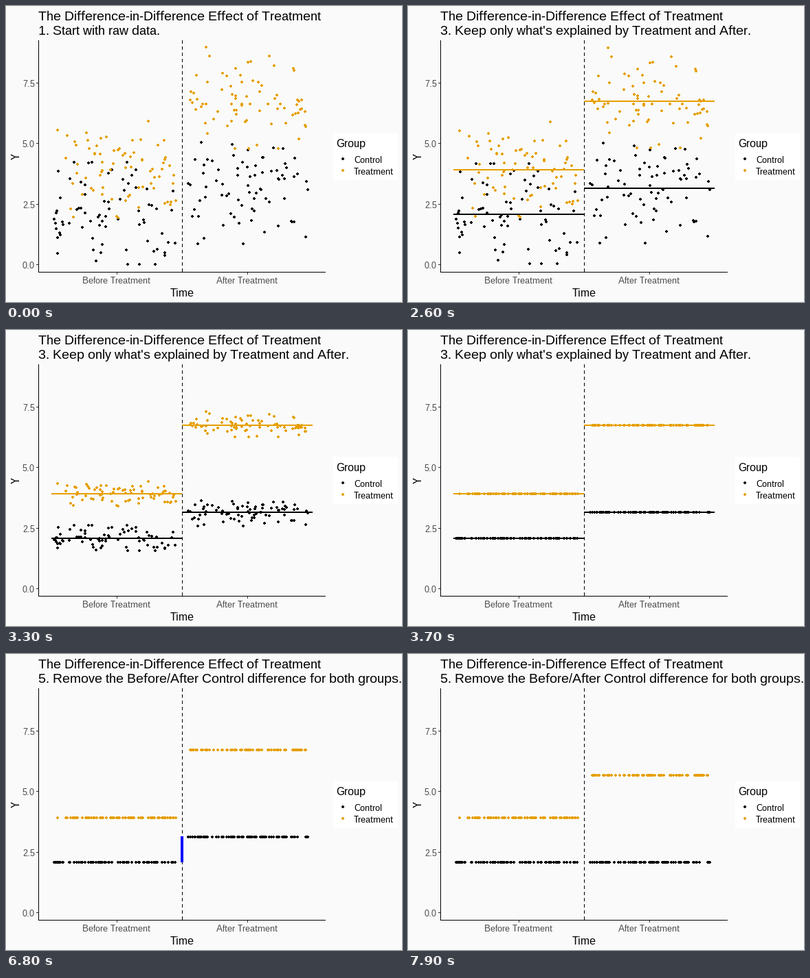
A matplotlib script that plays this animation: 576x432 px, repeating every 8 s.

```python
import matplotlib.pyplot as plt
import numpy as np
from matplotlib.animation import FuncAnimation
from matplotlib.patches import Rectangle

plt.rcParams.update({
    "font.family": "Liberation Sans",
    "text.hinting": "native",
    "text.hinting_factor": 1,
    "text.kerning_factor": 12,
})

W, H, STEP, LOOP = 576, 432, 100, 8000
BLACK, GOLD, GREY, DARK = "#000000", "#E69F00", "#4D4D4D", "#333333"
LEFT, SPLIT, RIGHT, BASE, TOP = 47, 256, 465, 388, 50
UNIT = 35.4  # pixels per unit of Y
PER_GROUP = 75

TITLES = [
    (0, "1. Start with raw data."),
    (500, "2. Explain Y using Treatment and After."),
    (2600, "3. Keep only what's explained by Treatment and After."),
    (4700, "4. See how Control changed Before to After."),
    (6800, "5. Remove the Before/After Control difference for both groups."),
]

# Colour, after treatment?, height of the group mean
GROUPS = [(BLACK, 0, 304), (GOLD, 0, 239), (BLACK, 1, 266), (GOLD, 1, 139)]
CTRL_BEFORE, CTRL_AFTER = GROUPS[0][2], GROUPS[2][2]
SHIFT = CTRL_BEFORE - CTRL_AFTER


def noise(rng):
    """Residuals around a group mean, in pixels."""
    e = np.clip(rng.normal(0, UNIT, PER_GROUP), -2.1 * UNIT, 2.1 * UNIT)
    return e - e.mean()


def ease(t, start):
    """Sine in-out over twelve steps, the first one landing at start."""
    p = np.clip((t - start + STEP) / (12 * STEP), 0, 1)
    return (1 - np.cos(np.pi * p)) / 2


fig = plt.figure(figsize=(W / 72, H / 72), dpi=72, facecolor="#FAFAFA")
ax = fig.add_axes([0, 0, 1, 1])
ax.set(xlim=(0, W), ylim=(H, 0))
ax.axis("off")


def stroke(x, y, color=BLACK, lw=1, **kw):
    return ax.plot(x, y, color=color, lw=lw, antialiased=False, snap=False,
                   solid_capstyle="butt", dash_capstyle="butt", **kw)[0]


def label(x, y, s, size, color=BLACK, **kw):
    return ax.text(x, y, s, size=size, color=color, **kw)


# Axes
stroke([LEFT + .5] * 2, [BASE + 1, TOP], zorder=4)
stroke([LEFT, RIGHT], [BASE + .5] * 2, zorder=4)
for i in range(4):
    y = 377.5 - int(2.5 * UNIT * i)
    stroke([LEFT - 3, LEFT], [y, y], DARK)
    label(LEFT - 5, y + 5.5, f"{2.5 * i:.1f}", 13, GREY, ha="right")
for x, s in [(161, "Before Treatment"), (351, "After Treatment")]:
    stroke([x + .5, x + .5], [BASE + 1, BASE + 4], DARK)
    label(x - .5, 405, s, 13, GREY, ha="center")
label(256, 424, "Time", 16, ha="center")
label(15, 220, "Y", 16, ha="center", va="center", rotation=90)

# Legend
ax.add_patch(Rectangle((476, 185), 94, 69, color="white", lw=0))
label(480, 206, "Group", 16)
label(506, 229, "Control", 13)
label(506, 246, "Treatment", 13)

# Titles
label(47, 21, "The Difference-in-Difference Effect of Treatment", 19)
subtitle = label(47, 42, "", 19)

# Data; the legend keys share the marker collection
rng = np.random.default_rng(11)
colors, late, means = (np.repeat(col, PER_GROUP) for col in zip(*GROUPS))
px = np.round(np.where(late, rng.uniform(263, 441, late.size),
                       rng.uniform(70, 251, late.size)))
resid = np.concatenate([noise(rng) for _ in GROUPS])
KEYS = np.array([(490, 223), (490, 240)])

# Four-pixel dot with its corners cut, one quarter turned four times
quarter = np.array([2 + 1j, 1 + 1j, 1 + 2j])
turned = np.outer(1j ** np.arange(4), quarter).ravel()
dots = ax.scatter(np.r_[px, KEYS[:, 0]], np.r_[means, KEYS[:, 1]], s=4 ** 2,
                  c=[*colors, BLACK, GOLD], marker=np.c_[turned.real, turned.imag],
                  linewidths=0, antialiased=False, zorder=3)

stroke([SPLIT + .5] * 2, [BASE, TOP], dashes=(4, 4), zorder=2)
fits = [stroke([SPLIT, SPLIT + 190] if after else [SPLIT - 190, SPLIT],
               [mean, mean], color, 2, zorder=3.5)
        for color, after, mean in GROUPS]
gap = stroke([SPLIT, SPLIT], [CTRL_BEFORE, CTRL_AFTER], "#0000FF", 4, zorder=5)


def draw(i):
    t = i * STEP
    subtitle.set_text([s for start, s in TITLES if start <= t][-1])

    collapse, remove = ease(t, 2600), ease(t, 6800)
    y = means + resid * (1 - collapse) + SHIFT * remove * late
    dots.set_offsets(np.vstack([np.c_[px, np.round(y)], KEYS]))

    for line in fits:
        line.set_visible(900 <= t < 4700)
    gap.set_visible(t >= 5100 and remove < 1)
    gap.set_ydata([CTRL_BEFORE, CTRL_AFTER + SHIFT * remove])
    return [subtitle, dots, gap, *fits]


anim = FuncAnimation(fig, draw, frames=LOOP // STEP, interval=STEP,
                     repeat=True, blit=False)
plt.show()
```
